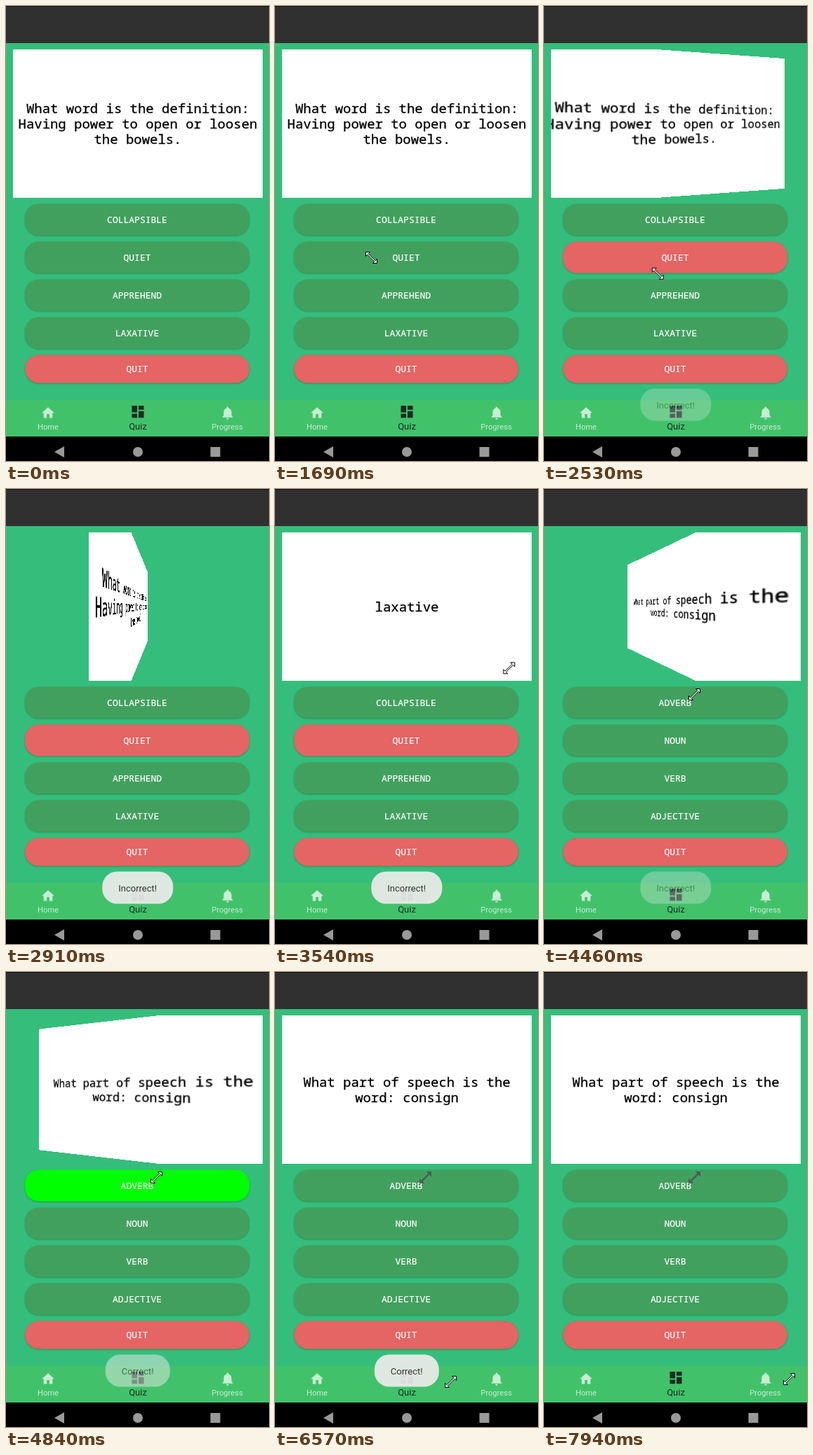
These frames come from a looping animation (375x650 px, 8000 ms). An HTML page:

```html
<!DOCTYPE html>
<html lang="en">
<head>
<meta charset="utf-8">
<title>Word quiz</title>
<style>
  html, body { margin: 0; width: 100%; height: 100%; overflow: hidden; background: #35be7b; }
  svg { position: absolute; left: 0; top: 0; }
  .window { position: absolute; left: 10px; top: 62px; width: 356px; height: 211.5px;
    overflow: hidden; perspective: 206px; }
  .card { width: 100%; height: 100%; background: #fff; color: #000; display: flex;
    align-items: center; justify-content: center; text-align: center; white-space: pre;
    font: 500 18.95px/22px "Noto Sans Mono", monospace; -webkit-text-stroke: .3px #000; }
  text { text-anchor: middle; }
  .button { font: 13px "Noto Sans Mono", monospace; fill: #fff; }
  .button text { stroke: #fff; stroke-width: .2px; }
  .button rect { filter: drop-shadow(0 1px 1px rgba(0, 0, 0, .25)); }
  .nav { font: 11.2px Roboto, sans-serif; fill: #c8edd3; }
  .nav .current { font-size: 13px; }
  .toast { font: 13px Roboto, sans-serif; fill: #333; }
</style>
</head>
<body>
<svg width="375" height="650">
  <rect width="375" height="53" fill="#303030"/>
  <rect width="375" height="1" fill="#111"/>
  <g id="buttons"></g>
  <rect y="563" width="375" height="52" fill="#41c26a"/>
  <g class="nav">
    <path transform="translate(49.2 570.5) scale(.9)" d="M10 20v-6h4v6h5v-8h3L12 3 2 12h3v8z"/>
    <text x="60" y="605">Home</text>
    <path transform="translate(304.8 570.2) scale(.93)" d="M12 22c1.1 0 2-.9 2-2h-4c0 1.1.9 2 2 2zm6-6v-5c0-3.07-1.64-5.64-4.5-6.32V4c0-.83-.67-1.5-1.5-1.5s-1.5.67-1.5 1.5v.68C7.63 5.36 6 7.92 6 11v5l-2 2v1h16v-1l-2-2z"/>
    <text x="315.5" y="605">Progress</text>
    <g fill="#1b2b21">
      <path transform="translate(176.6 568.2) scale(.95)" d="M3 13h8V3H3zm0 8h8v-6H3zm10 0h8V11h-8zm0-18v6h8V3z"/>
      <text class="current" x="188" y="605">Quiz</text>
    </g>
  </g>
  <rect y="615" width="375" height="35"/>
  <g fill="#999">
    <path d="M69 637l14-8v16z"/>
    <circle cx="188" cy="637" r="7"/>
    <rect x="291.5" y="630" width="14" height="14"/>
  </g>
</svg>
<div class="window"><div class="card" id="card"></div></div>
<svg width="375" height="650">
  <g class="toast" id="toast">
    <rect y="546.5" height="46" rx="21" fill="#ececec" fill-opacity=".92"/>
    <text x="187.7" y="575"></text>
  </g>
  <defs><path id="arrow" d="M-8-8H-2L-4.3-5.7 5.7 4.3 8 2V8H2L4.3 5.7-5.7-4.3-8-2Z"/></defs>
  <use id="trace" href="#arrow" transform="translate(214.5 293.5) scale(-1 1)" fill="#4a6054" stroke="#4a6054"/>
  <use id="cursor" href="#arrow" fill="#fff" stroke="#000"/>
</svg>
<script>
const LOOP = 8000, GREEN = '#42a05f', RED = '#e56464';
const $ = id => document.getElementById(id);
const clamp = v => Math.max(0, Math.min(1, v));
const progress = (t, from, to) => clamp((t - from) / (to - from));

const words = [
  ['COLLAPSIBLE', 'QUIET', 'APPREHEND', 'LAXATIVE', 'QUIT'],
  ['ADVERB', 'NOUN', 'VERB', 'ADJECTIVE', 'QUIT']
];
const faces = [
  'What word is the definition:\nHaving power to open or loosen\nthe bowels.',
  'laxative',
  'What part of speech is the\nword: consign'
];
// Start, edge-on moment and end of each card flip
const flips = [[2440, 2950, 3450], [3540, 4084, 5095]];
// Time, x, y
const cursorPath = [
  [310, 234.5, 432.5], [380, 223.5, 412.5], [590, 223.5, 412.5], [1000, 160.5, 349.5],
  [1380, 160.5, 349.5], [1460, 143.5, 362.5], [1610, 143.5, 362.5], [1690, 137.5, 359.5],
  [2440, 137.5, 359.5], [2750, 222, 437], [3390, 384, 240], [3900, 214.5, 293.5],
  [6250, 214.5, 293.5], [6570, 250.5, 585.5], [6850, 294.5, 570.5], [7050, 294.5, 570.5],
  [7250, 165.5, 520.5], [7700, 165.5, 520.5], [7940, 349.5, 581.5]
];
// Text, width, fade-in and fade-out times
const toasts = [
  ['Incorrect!', 101, 2460, 2700, 4300, 4550],
  ['Correct!', 92, 4680, 4980, 6980, 7250]
];

const pill = (y, h) => `<rect x="27" y="${y}" width="320" height="${h}" rx="20"/>`;
$('buttons').innerHTML = words[0].map((_, i) => {
  const y = i < 4 ? 282.5 + 54 * i : 498.5, h = i < 4 ? 45 : 40;
  const ripple = `<clipPath id="pill">${pill(y, h)}</clipPath>
    <g clip-path="url(#pill)"><circle id="ripple" cx="137" cy="359"/></g>`;
  return `<g class="button">${pill(y, h)}${i === 1 ? ripple : ''}
    <text x="187" y="${Math.round(y + h / 2 + 4.5)}"></text></g>`;
}).join('');
const buttons = [...document.querySelectorAll('.button')].map(g => ({
  box: g.querySelector('rect'), label: g.querySelector('text')
}));

function setText(node, text) {
  if (node.textContent !== text) node.textContent = text;
}

function drawCard(t) {
  let angle = 0, face = 0;
  for (const [start, mid, end] of flips) {
    if (t >= mid) {
      face++;
      angle = -90 * (1 - progress(t, mid, end)) ** 1.4;
    } else if (t >= start) {
      angle = 90 * progress(t, start, mid) ** 1.4;
    }
  }
  const depth = 64 * (Math.abs(angle) / 90) ** 1.15;
  $('card').style.transform = angle ? `translateZ(${-depth}px) rotateY(${angle}deg)` : 'none';
  setText($('card'), faces[face]);
}

function drawButtons(t) {
  const set = words[t < 4160 ? 0 : 1];
  buttons.forEach(({ box, label }, i) => {
    const wrong = i === 4 || (i === 1 && t >= 1920 && t < 4160);
    const right = i === 0 && t >= 4500 && t < 5620;
    box.setAttribute('fill', right ? '#0f0' : wrong ? RED : GREEN);
    setText(label, set[i]);
  });
  $('ripple').setAttribute('r', 230 * progress(t, 1760, 2050));
  $('ripple').setAttribute('fill', `rgba(255,255,255,${0.2 * (1 - progress(t, 1950, 2210))})`);
}

function drawToast(t) {
  const [text, width, in0, in1, out0, out1] = toasts[t < 4600 ? 0 : 1];
  const toast = $('toast'), box = toast.querySelector('rect');
  toast.setAttribute('opacity', progress(t, in0, in1) * (1 - progress(t, out0, out1)));
  box.setAttribute('x', 187.8 - width / 2);
  box.setAttribute('width', width);
  setText(toast.querySelector('text'), text);
}

function drawCursor(t) {
  const hidden = t < 310 || (t > 2750 && t < 3390);
  const next = cursorPath.findIndex(key => key[0] > t);
  const b = cursorPath[next < 0 ? cursorPath.length - 1 : next];
  const a = next > 0 ? cursorPath[next - 1] : b;
  const k = a === b ? 1 : progress(t, a[0], b[0]);
  const x = a[1] + (b[1] - a[1]) * k, y = a[2] + (b[2] - a[2]) * k;
  $('cursor').setAttribute('transform', `translate(${x} ${y}) scale(${t < 3000 ? 1 : -1} 1)`);
  $('cursor').setAttribute('opacity', hidden ? 0 : 1);
  $('trace').setAttribute('opacity', t > 6260 ? 1 : 0);
}

function frame() {
  const t = performance.now() % LOOP;
  drawCard(t);
  drawButtons(t);
  drawToast(t);
  drawCursor(t);
  requestAnimationFrame(frame);
}
frame();
</script>
</body>
</html>
```
